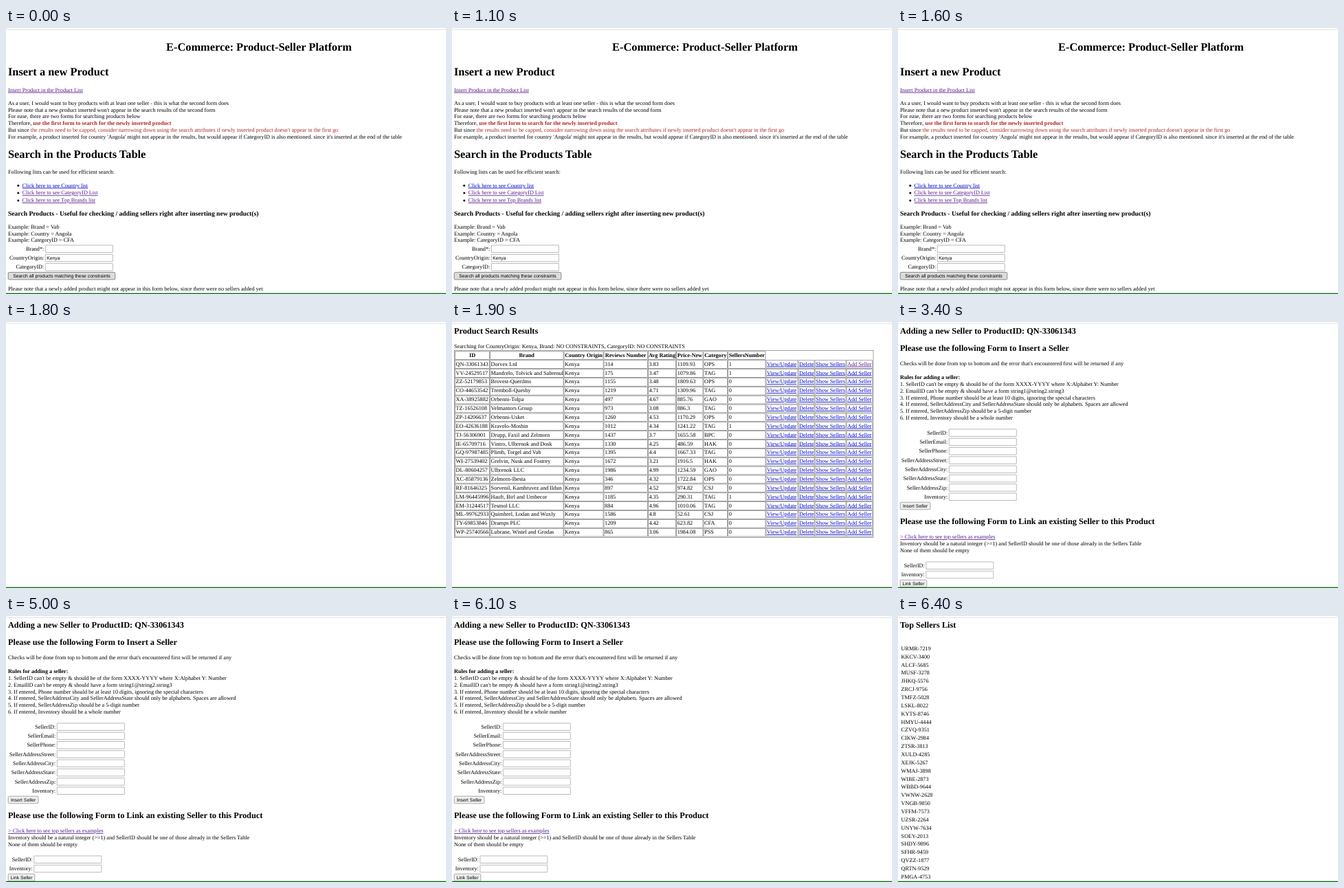
Write an HTML page that moves like this. It is 640 px wide and 387 px high and loops after 8 s.

```html
<!DOCTYPE html>
<html lang="en">
<head>
<meta charset="utf-8">
<title>Product-Seller Platform</title>
<style>
  html, body { margin: 0; width: 100%; height: 100%; overflow: hidden; background: #fff; }
  svg { display: block; width: 640px; height: 387px; }
  text { font: 8.19px "Liberation Serif", Times, serif; fill: #000; text-rendering: geometricPrecision; }
  .h1 { font-size: 16.38px; font-weight: bold; }
  .h2 { font-size: 12.28px; font-weight: bold; }
  .h3 { font-size: 9.58px; font-weight: bold; }
  .b { font-weight: bold; }
  .red { fill: #b22222; }
  .link { fill: #0000cc; text-decoration: underline; }
  .visited { fill: #551a8b; text-decoration: underline; }
  .ui { font: 6.83px "Liberation Sans", Arial, sans-serif; }
  .mid { text-anchor: middle; }
  .end { text-anchor: end; }
  .field { fill: #fff; stroke: #8a8a8a; stroke-width: .6; }
  .button { fill: #efefef; stroke: #767676; stroke-width: .6; }
  .pressed { fill: #dcdcdc; stroke: #444; }
  .cell { fill: none; stroke: #666; stroke-width: .6; }
</style>
</head>
<body>
<svg viewBox="0 0 640 387">
  <rect width="640" height="387" fill="#fff"/>
  <g id="pages"></g>
  <path d="M0 1 Q.5 2.3 2 2.3 H638 Q639.5 2.3 640 1" fill="none" stroke="#d8d8d8" stroke-width=".8"/>
  <rect y="385.7" width="640" height="1.3" fill="#0b6b12"/>
</svg>
<script>
const LINE = 9.8, FORM_ROW = 13.3, TABLE_ROW = 12.87;

const text = (x, y, content, cls = "") =>
  `<text x="${x}" y="${y.toFixed(2)}" class="${cls}">${content}</text>`;
const lines = (y, list) => list.map((s, i) => text(3, y + i * LINE, s)).join("");
const rect = (x, y, w, h, cls, r = 0) =>
  `<rect x="${x}" y="${y.toFixed(2)}" width="${w}" height="${h}" rx="${r}" class="${cls}"/>`;
const button = (y, w, label, cls = "") =>
  rect(3.2, y, w, 10.6, "button " + cls, 1.6) + text(3.2 + w / 2, y + 7.7, label, "ui mid");

// Right-aligned labels, each with an input whose left edge is at x.
const form = (x, y, labels, values = {}) => labels.map((label, i) => {
  const base = y + i * FORM_ROW;
  return text(x - 1.7, base, label + ":", "end") +
    rect(x + .3, base - 7.8, 98, 10.5, "field", .4) +
    (values[label] ? text(x + 2.2, base, values[label], "ui") : "");
}).join("");

function searchPage() {
  const lists = [["Country list", "link"], ["CategoryID List", "visited"], ["Top Brands list", "visited"]];
  return text(368, 33, "E-Commerce: Product-Seller Platform", "h1 mid") +
    text(3, 69, "Insert a new Product", "h1") +
    text(3, 92.6, "Insert Product in the Product List", "visited") +
    lines(111.8, [
      "As a user, I would want to buy products with at least one seller - this is what the second form does",
      "Please note that a new product inserted won't appear in the search results of the second form",
      "For ease, there are two forms for searching products below",
      'Therefore, <tspan class="b red">use the first form to search for the newly inserted product</tspan>',
      'But since <tspan class="red">the results need to be capped, consider narrowing down using the search attributes if newly inserted product doesn\'t appear in the first go</tspan>',
      "For example, a product inserted for country 'Angola' might not appear in the results, but would appear if CategoryID is also mentioned. since it's inserted at the end of the table"
    ]) +
    text(3, 189, "Search in the Products Table", "h1") +
    text(3, 212.2, "Following lists can be used for efficient search:") +
    lists.map(([name, cls], i) => {
      const y = 231.6 + i * 10.8;
      return `<circle cx="17.8" cy="${y - 2.3}" r="1.5"/>` + text(23.5, y, "Click here to see " + name, cls);
    }).join("") +
    text(3, 272.6, "Search Products - Useful for checking / adding sellers right after inserting new product(s)", "h3") +
    lines(291.8, ["Example: Brand = Vab", "Example: Country = Angola", "Example: CategoryID = CFA"]) +
    form(57, 323.8, ["Brand*", "CountryOrigin", "CategoryID"], { CountryOrigin: "Kenya" }) +
    button(355.4, 155.6, "Search all products matching these constraints", "pressed") +
    text(3, 381.8, "Please note that a newly added product might not appear in this form below, since there were no sellers added yet");
}

const PRODUCTS = `QN-33061343|Dorvex Ltd|314|3.83|1109.93|OPS|1
VV-24529517|Mandrelo, Tolvick and Sabrenul|175|3.47|1079.86|TAG|1
ZZ-52179853|Brovest-Querilms|1155|3.48|1809.63|OPS|0
CO-44653542|Tremboll-Quesby|1219|4.71|1309.96|TAG|0
XA-38925882|Orbenni-Tolpa|497|4.67|885.76|GAO|0
TZ-16526108|Velmantors Group|973|3.08|886.3|TAG|0
ZP-14206637|Orbenni-Usket|1260|4.53|1170.29|OPS|0
EO-42636188|Kravelo-Mosbin|1012|4.34|1241.22|TAG|1
TJ-56306901|Drupp, Faxil and Zelmorn|1437|3.7|1655.58|BPC|0
IE-65709716|Vintro, Ulbrenok and Dosk|1330|4.25|486.59|HAK|0
GQ-97987485|Plimb, Torgel and Vab|1395|4.4|1667.33|TAG|0
WI-27539402|Grelvin, Nusk and Fostrey|1672|3.21|1916.5|HAK|0
DL-80604257|Ulbrenok LLC|1986|4.99|1234.59|GAO|0
XC-85879136|Zelmorn-Ibesta|346|4.32|1722.84|OPS|0
RF-81646325|Sorvenil, Kambruvez and Ildun|897|4.52|974.82|CSJ|0
LM-96445996|Hauft, Birl and Umbecor|1185|4.35|290.31|TAG|1
EM-31244517|Tesmol LLC|884|4.96|1010.06|TAG|0
ML-99762933|Quimbrel, Lodan and Wuxly|1586|4.8|52.61|CSJ|0
TY-69853846|Dramps PLC|1209|4.42|623.82|CFA|0
WP-25740566|Lubrane, Wistel and Grodas|865|3.06|1984.08|PSS|0`;

function resultsPage() {
  const edges = [4.5, 55.5, 163, 221, 285.3, 326.6, 366, 401.6, 457, 504, 528, 574, 612.3];
  const headers = ["ID", "Brand", "Country Origin", "Reviews Number", "Avg Rating", "Price-New", "Category", "SellersNumber"];
  const actions = ["View/Update", "Delete", "Show Sellers", "Add Seller"];
  const cell = (col, row, content, cls) => {
    const left = edges[col], w = edges[col + 1] - left - 1;
    const x = row ? left + 1.1 : left + w / 2;
    return rect(left, 42.9 + row * TABLE_ROW, w.toFixed(2), 11.7, "cell") +
      text(x, 50.8 + row * TABLE_ROW, content, cls);
  };
  const rows = PRODUCTS.split("\n").map((record, i) => {
    const values = record.split("|");
    values.splice(2, 0, "Kenya");
    return values.map((v, col) => cell(col, i + 1, v, "")).join("") +
      actions.map((a, j) => cell(8 + j, i + 1, a, i === 0 && j === 3 ? "visited" : "link")).join("");
  });
  return text(3, 17.3, "Product Search Results", "h2") +
    text(3, 38.3, "Searching for CountryOrigin: Kenya, Brand: NO CONSTRAINTS, CategoryID: NO CONSTRAINTS") +
    rect(3.3, 41.6, 609.6, 272, "cell") +
    headers.map((h, col) => cell(col, 0, h, "b mid")).join("") + rows.join("");
}

function sellerPage() {
  return text(3, 17.3, "Adding a new Seller to ProductID: QN-33061343", "h2") +
    text(3, 42, "Please use the following Form to Insert a Seller", "h2") +
    text(3, 63.3, "Checks will be done from top to bottom and the error that's encountered first will be returned if any") +
    lines(83.2, [
      '<tspan class="b">Rules for adding a seller:</tspan>',
      "1. SellerID can't be empty &amp; should be of the form XXXX-YYYY where X:Alphabet Y: Number",
      "2. EmailID can't be empty &amp; should have a form string1@string2.string3",
      "3. If entered, Phone number should be at least 10 digits, ignoring the special characters",
      "4. If entered, SellerAddressCity and SellerAddressState should only be alphabets. Spaces are allowed",
      "5. If entered, SellerAddressZip should be a 5-digit number",
      "6. If entered, Inventory should be a whole number"
    ]) +
    form(74, 163.7, ["SellerID", "SellerEmail", "SellerPhone", "SellerAddressStreet",
      "SellerAddressCity", "SellerAddressState", "SellerAddressZip", "Inventory"]) +
    button(262.2, 43.8, "Insert Seller") +
    text(3, 293.6, "Please use the following Form to Link an existing Seller to this Product", "h2") +
    text(3, 315.2, "&gt; Click here to see top sellers as examples", "visited") +
    lines(325, [
      "Inventory should be a natural integer (&gt;=1) and SellerID should be one of those already in the Sellers Table",
      "None of them should be empty"
    ]) +
    form(40.5, 356.8, ["SellerID", "Inventory"]) +
    button(375.2, 38.6, "Link Seller");
}

function topSellersPage() {
  const sellers = ("URMR-7219 KKCV-3400 ALCF-5685 MUSF-3278 JHKQ-5576 ZRCJ-9756 TMFZ-5028 LSKL-8022 " +
    "KYTS-8746 HMYU-4444 CZVQ-9351 CIKW-2984 ZTSR-3813 XULD-4285 XEJK-5267 WMAJ-3898 WIBE-2873 " +
    "WBBD-9644 VWNW-2628 VNGB-9850 VFFM-7573 UZSR-2264 UNYW-7634 SOEY-2013 SHDY-9896 SFHR-9459 " +
    "QVZZ-1877 QRTN-9529 PMGA-4753").split(" ");
  return text(3, 17.3, "Top Sellers List", "h2") +
    sellers.map((id, i) => text(4.6, 49.8 + i * 11.857, id)).join("");
}

const DURATION = 8000;
const scenes = [
  { start: 0, draw: searchPage },
  { start: 1800, draw: () => "" },
  { start: 1900, draw: resultsPage },
  { start: 3400, draw: sellerPage },
  { start: 6400, draw: topSellersPage }
];
const pages = document.getElementById("pages");
pages.innerHTML = scenes.map(s => `<g display="none">${s.draw()}</g>`).join("");

function render(time) {
  const current = scenes.findLastIndex(s => s.start <= time);
  [...pages.children].forEach((page, i) =>
    page.setAttribute("display", i === current ? "inline" : "none"));
}

const origin = performance.now();
function tick() {
  render((performance.now() - origin) % DURATION);
  requestAnimationFrame(tick);
}
tick();
</script>
</body>
</html>
```
